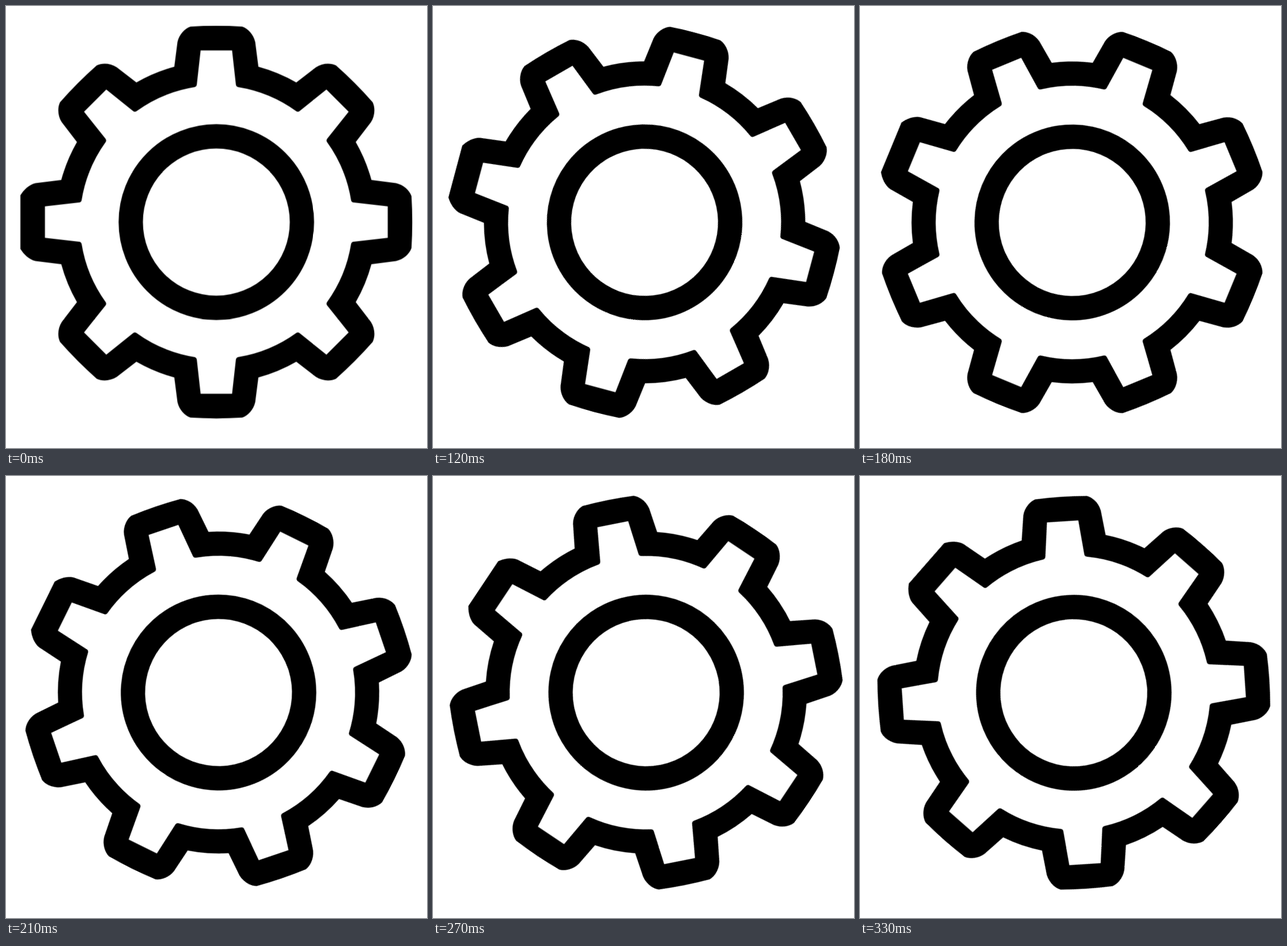
Write an HTML page that moves like this. It is 731x766 px and loops after 0.36 s.

```html
<!DOCTYPE html>
<html lang="en">
<head>
<meta charset="utf-8">
<title>Turning gear</title>
<style>
  html, body { margin: 0; width: 100%; height: 100%; overflow: hidden; background: #fff; }
  svg { display: block; width: 100%; height: 100%; }
  #gear { animation: turn 360ms steps(12, end) infinite; }
  /* one tooth per loop, with a slight drift of the axle */
  @keyframes turn {
    from { transform: translate(0px, 0px) rotate(0deg); }
    to { transform: translate(6.6px, 1.3px) rotate(45deg); }
  }
</style>
</head>
<body>
<svg viewBox="0 0 731 766">
  <g transform="translate(365.2 374.5)">
    <g id="gear">
      <path id="rim" fill-rule="evenodd"/>
      <circle r="148.6" fill="none" stroke="#000" stroke-width="42.2"/>
    </g>
  </g>
</svg>
<script>
  const TEETH = 8, LEFT = 6;
  const OUTER = 279, INNER = 237;

  // Turns the x,y pairs of an upright tooth to the place of tooth i.
  function place(i, ...xy) {
    const a = i * 2 * Math.PI / TEETH, c = Math.cos(a), s = Math.sin(a);
    const out = [];
    for (let k = 0; k < xy.length; k += 2) {
      const x = xy[k], y = xy[k + 1];
      out.push((x * c - y * s).toFixed(2), (x * s + y * c).toFixed(2));
    }
    return out.join(' ');
  }

  const arcTo = (r, end) => `A${r} ${r} 0 0 1 ${end}`;

  function outerTooth(i) {
    const p = (...xy) => place(i, ...xy);
    const start = p(-73, -269.3);
    let d = i ? arcTo(OUTER, start) : 'M' + start;
    if (i === LEFT) {
      // this tooth has a flat tip with sharp ends
      d += `L${p(-67.5, -314)}C${p(-64.6, -326, -56, -334, -46.5, -340.2)}`
        + `L${p(46.5, -340.2)}C${p(56, -334, 64.6, -326, 67.5, -314)}`;
    } else {
      d += `L${p(-67.5, -312)}C${p(-64.6, -325, -55, -335.5, -45, -338.8)}`
        + `Q${p(0, -341.6, 45, -338.8)}C${p(55, -335.5, 64.6, -325, 67.5, -312)}`;
    }
    return d + 'L' + p(73, -269.3);
  }

  function innerTooth(i) {
    const p = (...xy) => place(i, ...xy);
    const start = p(-37.5, -234);
    return (i ? arcTo(INNER, start) : 'M' + start)
      + `Q${p(-34.3, -235, -33.9, -238.5)}L${p(-27.3, -297.6)}`
      + `L${p(27.3, -297.6)}L${p(33.9, -238.5)}Q${p(34.3, -235, 37.5, -234)}`;
  }

  function outline(tooth, r, base) {
    let d = '';
    for (let i = 0; i < TEETH; i++) d += tooth(i);
    return d + arcTo(r, place(0, ...base)) + 'Z';
  }

  document.getElementById('rim').setAttribute('d',
    outline(outerTooth, OUTER, [-73, -269.3]) + outline(innerTooth, INNER, [-37.5, -234]));
</script>
</body>
</html>
```
